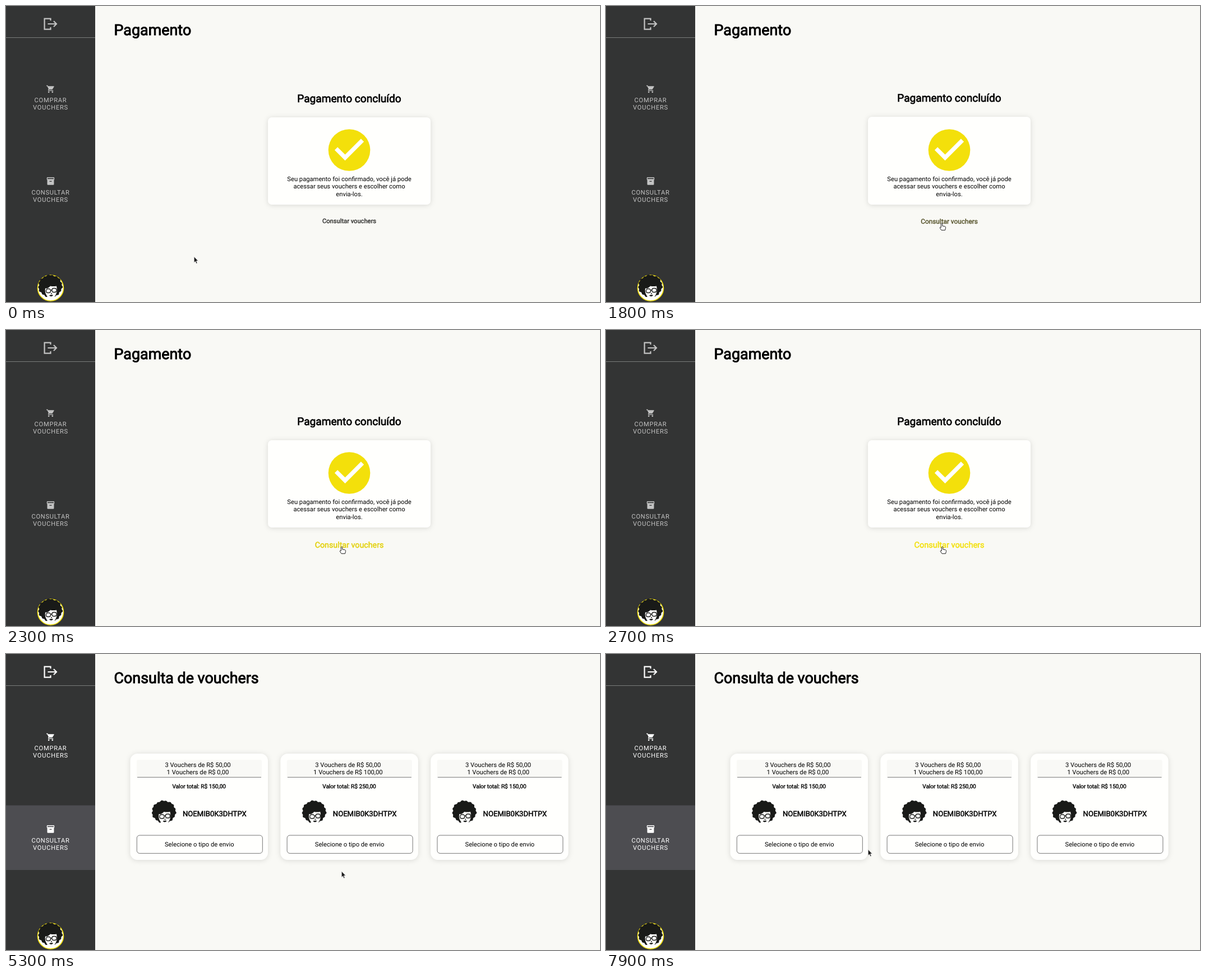
An HTML page that plays this animation: 1059 px wide and 529 px high, repeating every 8000 ms.

```html
<!DOCTYPE html>
<html lang="pt">
<head>
<meta charset="utf-8">
<title>Vouchers</title>
<style>
  html, body { margin: 0; width: 100%; height: 100%; overflow: hidden; background: #f9f9f5; }
  svg { display: block; width: 100%; height: 100%; }
  text { font: 11.2px Roboto, sans-serif; text-rendering: geometricPrecision; }
  .mid { text-anchor: middle; }
  .bold { stroke: currentColor; fill: currentColor; stroke-width: .036em; }
  .title { font-size: 26.9px; }
  .heading { font-size: 19.1px; }
  .total { font-size: 10.08px; }
  .coupon { font-size: 13.1px; }
  .menu text { letter-spacing: .7px; }
  .card { fill: #fffffd; filter: drop-shadow(0 1px 5px rgba(0, 0, 0, .13)); }
</style>
</head>
<body>
<svg viewBox="0 0 1059 529">
  <defs>
    <g id="portrait">
      <path id="hair" fill="#191a18"/>
      <path fill="#fffffd" d="M-9 3Q-4 4 0-1Q5 0 11-1Q13 8 10 14Q6 22 1 22Q-4 21-7 15Q-10 11-9 3Z"/>
      <g fill="none" stroke="#191a18" stroke-width="1.3">
        <rect x="-7.5" y="4" width="8" height="7" rx="3"/>
        <rect x="3" y="3" width="8" height="7" rx="3"/>
        <path d="M.5 6.5L3 6M1 12.5H3"/>
      </g>
      <path fill="#191a18" d="M-2 16Q0 14 1.5 15Q3 14 5 15.5Q2 19-2 16Z"/>
    </g>
  </defs>

  <rect width="1059" height="529" fill="#f9f9f5"/>
  <rect width="159" height="529" fill="#333434"/>
  <rect id="active" y="270.5" width="159" height="115.5" fill="#4d4d51"/>
  <path d="M0 56.5H159" stroke="#7b7d7c"/>

  <g id="menu" class="menu mid">
    <g fill="none" stroke="currentColor" stroke-width="2.2">
      <path d="M79.5 26V22.6H68.6V41.6H79.5V38"/>
      <path d="M74.5 32H90M85 27L90 32L85 37"/>
    </g>
    <g fill="currentColor">
      <g transform="translate(71.5 140.5) scale(.667)">
        <path d="M1 2H4.3L5.2 4H20.5Q22 4.4 21 6L17.3 12Q16.7 13 15.5 13H8.1L7 15H19V17H7Q4.5 16.500 5.300 14L6.600 11.600L3 4H1Z"/>
        <circle cx="7" cy="20" r="2"/><circle cx="17" cy="20" r="2"/>
      </g>
      <path fill-rule="evenodd" d="M74 306H85Q86.200 306 86.200 307.300V310.500H85.500V318.500Q85.500 319.700 84.300 319.700H74.700Q73.500 319.700 73.500 318.500V310.500H72.800V307.300Q72.800 306 74 306ZM74 307.400V309.300H85V307.400ZM77.500 312.700V314.100H81.500V312.700Z"/>
      <text x="79.5" y="172">COMPRAR</text><text x="79.5" y="185">VOUCHERS</text>
      <text x="79.5" y="336.500">CONSULTAR</text><text x="79.5" y="349.700">VOUCHERS</text>
    </g>
  </g>
  <circle cx="79.5" cy="504" r="23" fill="#fffffd" stroke="#f3e00b" stroke-width="1.6"/>
  <use href="#portrait" x="79" y="501.500"/>

  <g id="payment">
    <text class="bold title" x="192.500" y="52">Pagamento</text>
    <text class="bold heading mid" id="heading" x="612" y="172">Pagamento concluído</text>
    <rect class="card" id="panel" x="467" width="290" rx="7"/>
    <g id="confirmation" class="mid">
      <circle cx="612" cy="257.500" r="37.300" fill="#f3e00b"/>
      <path fill="#fffffd" transform="translate(567.240 212.740) scale(3.730)" d="M10 17L5 12L6.410 10.590L10 14.170L17.590 6.580L19 8Z"/>
      <text x="612" y="313">Seu pagamento foi confirmado, você já pode</text>
      <text x="612" y="326">acessar seus vouchers e escolher como</text>
      <text x="612" y="339.500">envia-los.</text>
    </g>
    <text class="bold mid" id="link" x="612">Consultar vouchers</text>
  </g>

  <g id="vouchers">
    <text class="bold title" x="192.500" y="52">Consulta de vouchers</text>
  </g>

  <path id="arrow" fill="#191919" stroke="#eee" stroke-width=".6" d="M0 0V10.500L2.400 8.300L4 12.300L5.700 11.500L4 7.600H7.200Z"/>
  <path id="hand" fill="#fff" stroke="#222" d="M-1.200 1Q0-.5 1.200 1V5L6 6Q7.500 6.500 7 8.500L6 12.700H-.5L-3.300 8.500Q-3.300 6.500-1.200 7.800Z"/>
</svg>
<script>
const $ = id => document.getElementById(id);
const LOOP = 8000, STEP = 100;
const PAGE_CHANGE = 4800, CARDS_SHOWN = 5300;
const HOVER_START = 1650, HOVER_LENGTH = 1000;

// Curly hair outline: a circle with small ripples.
$('hair').setAttribute('d', 'M' + Array.from({ length: 90 }, (_, i) => {
  const a = i / 90 * 2 * Math.PI;
  const r = 20.5 + .8 * Math.sin(17 * a) + .5 * Math.sin(7 * a + 1);
  return `${(r * 1.03 * Math.cos(a)).toFixed(1)} ${(r * .96 * Math.sin(a) - 1).toFixed(1)}`;
}).join('L') + 'Z');

const voucherCard = ([second, total], i) => `
  <g transform="translate(${221.5 + i * 267.8} 178)">
    <rect class="card" width="245.500" height="190" rx="13"/>
    <rect x="11.500" y="11" width="223" height="31.500" rx="3" fill="#f9f9f6"/>
    <path d="M12.500 42.300H233.500" stroke="#777"/>
    <g class="mid">
      <text x="120.500" y="24">3 Vouchers de R$ 50,00</text>
      <text x="120.500" y="37">1 Vouchers de R$ ${second}</text>
      <text class="bold total" x="122.700" y="62">Valor total: R$ ${total}</text>
      <text x="123.300" y="166">Selecione o tipo de envio</text>
    </g>
    <use href="#portrait" x="60" y="105"/>
    <text class="bold coupon" x="93.500" y="112">NOEMIB0K3DHTPX</text>
    <rect x="11.800" y="146" width="224" height="32.300" rx="5" fill="none" stroke="#666" stroke-width=".9"/>
  </g>`;
const cards = document.createElementNS('http://www.w3.org/2000/svg', 'g');
cards.innerHTML = [['0,00', '150,00'], ['100,00', '250,00'], ['0,00', '150,00']].map(voucherCard).join('');
$('vouchers').append(cards);

// Pointer stops: time, x, y
const pointerStops = [
  [0, 335.3, 448], [800, 390, 440], [900, 495, 420], [1000, 570, 402], [1100, 594, 397],
  [1600, 596, 392], [1700, 598.5, 388], [2000, 598.5, 387], [2400, 599.5, 387],
  [4800, 598.3, 388.5], [7800, 545, 371], [7900, 467.3, 349.5]
];

// The CSS "ease" curve, cubic-bezier(.25, .1, .25, 1)
function ease(x) {
  if (x <= 0 || x >= 1) return Math.min(1, Math.max(0, x));
  const bezier = (u, a, b) => 3 * u * (1 - u) ** 2 * a + 3 * u * u * (1 - u) * b + u ** 3;
  let low = 0, high = 1;
  for (let i = 0; i < 20; i++) {
    const u = (low + high) / 2;
    if (bezier(u, .25, .25) < x) low = u; else high = u;
  }
  return bezier(low, .1, 1);
}

const show = (element, on) => { element.style.display = on ? '' : 'none'; };
const place = (element, x, y) => element.setAttribute('transform', `translate(${x} ${y})`);

function drawPayment(time) {
  const hover = ease((time - HOVER_START) / HOVER_LENGTH);
  const size = 11.2 * (1 + .3 * hover);
  const shift = -(Math.round(size * 1.172) - 13) / 2;
  const top = 199 + Math.floor(shift), bottom = 355 + Math.round(shift);
  place($('heading'), 0, Math.floor(shift));
  place($('confirmation'), 0, Math.round(shift));
  $('panel').setAttribute('y', top);
  $('panel').setAttribute('height', bottom - top);
  const channel = (from, to) => Math.round(from + (to - from) * hover);
  $('link').style.fontSize = size + 'px';
  $('link').style.color = `rgb(${channel(48, 243)}, ${channel(48, 224)}, ${channel(46, 11)})`;
  $('link').setAttribute('y', hover > .1 ? 389 : 388);
}

function draw(now) {
  const time = Math.floor(now % LOOP / STEP) * STEP;
  const listing = time >= PAGE_CHANGE;
  show($('payment'), !listing);
  show($('vouchers'), listing);
  show($('active'), listing);
  show(cards, time >= CARDS_SHOWN);
  $('menu').style.color = listing ? '#fff' : '#c3c3c3';
  drawPayment(time);

  const pointing = time >= 1700 && !listing;
  const [, x, y] = pointerStops.findLast(stop => stop[0] <= time);
  show($('hand'), pointing);
  show($('arrow'), !pointing);
  place($(pointing ? 'hand' : 'arrow'), x, y);
}

const start = performance.now();
function tick() {
  draw(performance.now() - start);
  requestAnimationFrame(tick);
}
tick();
</script>
</body>
</html>
```
